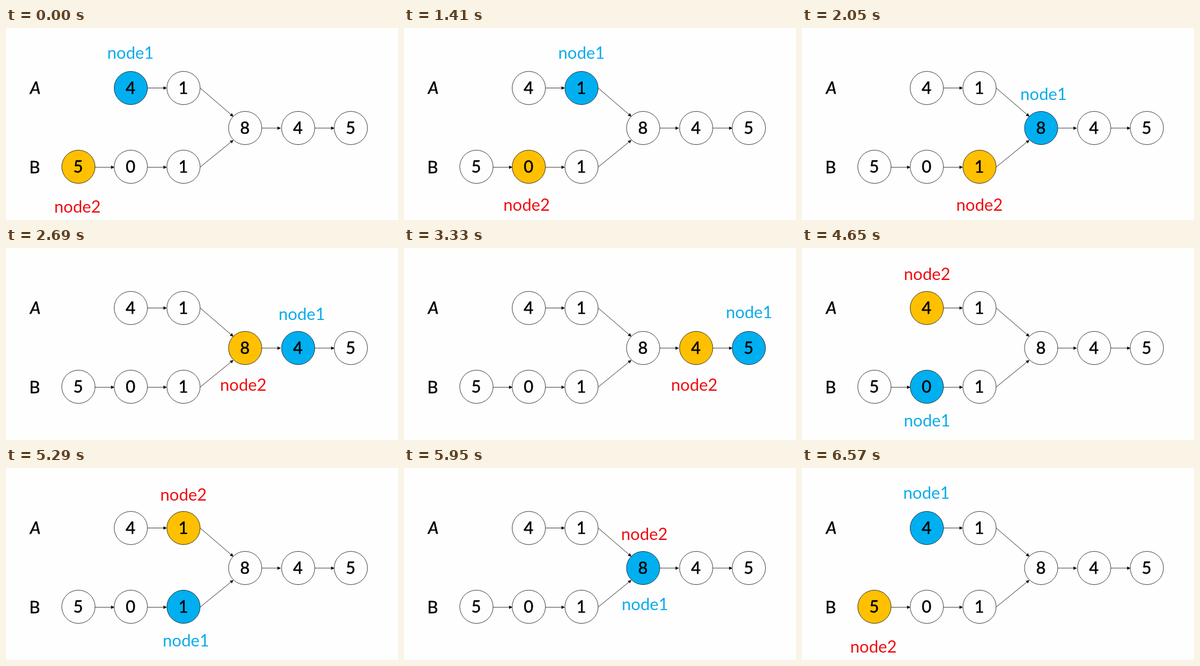
An HTML page with a canvas that plays this animation: 636x312 px, repeating every 7020 ms.

```html
<!DOCTYPE html>
<html lang="en">
<head>
<meta charset="utf-8">
<title>Linked list intersection</title>
<style>
  html, body { margin: 0; width: 100%; height: 100%; overflow: hidden; background: #fefefe; }
  canvas { display: block; width: 636px; height: 312px; }
</style>
</head>
<body>
<canvas id="stage"></canvas>
<script>
const W = 636, H = 312, LOOP = 7020, R = 27, LINE = 0.7;
const PAPER = '#fefefe', INK = '#000';
const BLUE = '#00aff0', ORANGE = '#ffc000', RED = '#f00c10', SKY = '#0cabea';
const FONT = '27px "Comic Sans MS", Lato, "Open Sans", sans-serif';

const canvas = document.getElementById('stage');
const ctx = canvas.getContext('2d');
const dpr = window.devicePixelRatio || 1;
canvas.width = W * dpr;
canvas.height = H * dpr;

const nodes = {
  a1: [202.5, 97.5, '4'], a2: [288, 97.5, '1'],
  b1: [117.5, 225.5, '5'], b2: [202.5, 225.5, '0'], b3: [288, 225.5, '1'],
  c1: [388, 162.5, '8'], c2: [474, 162.5, '4'], c3: [559.5, 162.5, '5']
};

const arrows = [
  [229, 97.5, 261, 97.5], [144, 226.3, 176, 226.3], [229, 226.3, 261, 226.3],
  [415, 162.7, 446, 162.7], [501, 162.7, 533, 162.7],
  [315, 97.5, 369, 144], [315, 226, 369, 182]
];

// start time, then node, label centre and baseline for each pointer
const steps = [
  { at: 0,    p1: ['a1', 202, 50],  p2: ['b1', 116, 300] },
  { at: 1410, p1: ['a2', 288, 50],  p2: ['b2', 199, 297] },
  { at: 2050, p1: ['c1', 392, 117], p2: ['b3', 288, 297] },
  { at: 2690, p1: ['c2', 480, 117], p2: ['c1', 385, 232] },
  { at: 3330, p1: ['c3', 560, 114], p2: ['c2', 471, 232] },
  { at: 3990, p1: ['b1', 119, 295], p2: ['c3', 560, 232] },
  { at: 4650, p1: ['b2', 203, 290], p2: ['a1', 203, 52] },
  { at: 5290, p1: ['b3', 292, 290], p2: ['a2', 288, 53] },
  { at: 5950, p1: ['c1', 391, 231], p2: ['c1', 390, 117] },
  { at: 6570, p1: ['a1', 202, 50],  p2: ['b1', 116, 300] }
];

function write(text, x, y, color, style = '') {
  ctx.font = style + FONT;
  ctx.fillStyle = color;
  ctx.fillText(text, x, y);
}

function writeBold(text, x, y, style) {
  write(text, x, y, INK, style);
  ctx.strokeStyle = INK;
  ctx.lineWidth = 0.5;
  ctx.strokeText(text, x, y);
}

function arrow([x1, y1, x2, y2]) {
  const len = Math.hypot(x2 - x1, y2 - y1);
  ctx.save();
  ctx.translate(x1, y1);
  ctx.rotate(Math.atan2(y2 - y1, x2 - x1));
  ctx.strokeStyle = ctx.fillStyle = INK;
  ctx.lineWidth = LINE;
  ctx.beginPath();
  ctx.moveTo(0, 0);
  ctx.lineTo(len - 5, 0);
  ctx.stroke();
  ctx.beginPath();
  ctx.moveTo(len, 0);
  ctx.lineTo(len - 5.5, -2.7);
  ctx.lineTo(len - 5.5, 2.7);
  ctx.fill();
  ctx.restore();
}

function circle([x, y, digit], fill) {
  ctx.beginPath();
  ctx.arc(x, y, R, 0, Math.PI * 2);
  ctx.fillStyle = fill;
  ctx.fill();
  ctx.strokeStyle = INK;
  ctx.lineWidth = LINE;
  ctx.stroke();
  writeBold(digit, x - 0.5, y + 9.5);
}

function draw(time) {
  const { p1, p2 } = steps.findLast(s => time >= s.at);
  ctx.setTransform(dpr, 0, 0, dpr, 0, 0);
  ctx.fillStyle = PAPER;
  ctx.fillRect(0, 0, W, H);
  ctx.textAlign = 'center';
  ctx.lineJoin = 'round';

  arrows.forEach(arrow);
  for (const id in nodes) {
    circle(nodes[id], id === p1[0] ? BLUE : id === p2[0] ? ORANGE : PAPER);
  }
  writeBold('A', 47.5, 107, 'italic ');
  writeBold('B', 46.5, 235.5);
  write('node1', p1[1], p1[2], SKY);
  write('node2', p2[1], p2[2], RED);
}

const start = performance.now();
function tick() {
  draw((performance.now() - start) % LOOP);
  requestAnimationFrame(tick);
}
tick();
</script>
</body>
</html>
```
